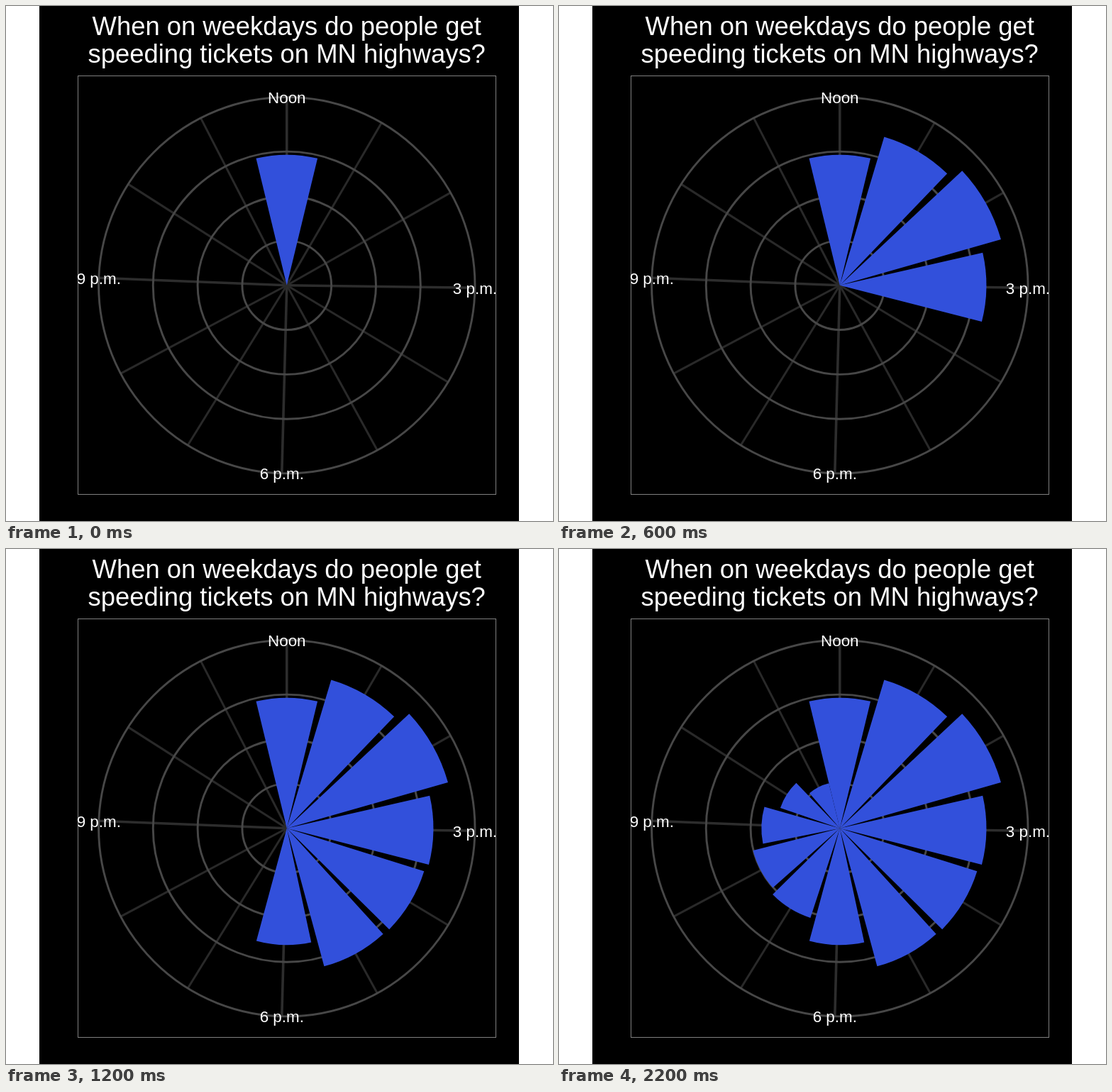
Write an HTML page with a canvas that moves like this. It is 771x726 px and loops after 2.4 s.

```html
<!DOCTYPE html>
<html lang="en">
<head>
<meta charset="utf-8">
<title>Speeding tickets by hour</title>
<style>
html, body { margin: 0; width: 100%; height: 100%; overflow: hidden; background: #fff; }
canvas { display: block; }
</style>
</head>
<body>
<canvas id="stage" width="771" height="726"></canvas>
<script>
const ctx = document.getElementById('stage').getContext('2d');
const CX = 395.8, CY = 393.7, R = 265.2, RING = 62.85;
const STEP = 200;
// The dial spans eleven hour steps plus one bar width of 0.9 hours.
const HOUR = 2 * Math.PI / 11.9, HALF = 0.45 * HOUR;
const bars = [184, 218.4, 236.2, 206.6, 202.8, 201.6, 164.4, 133, 126.2, 110.5, 88.6, 65.4];
const labels = { 0: 'Noon', 3: '3 p.m.', 6: '6 p.m.', 9: '9 p.m.' };

const point = (hour, r) => [CX + r * Math.sin(hour * HOUR), CY - r * Math.cos(hour * HOUR)];

function text(str, x, y, size) {
  ctx.font = `${size}px "Liberation Sans", Arial, sans-serif`;
  ctx.fillText(str, x, y);
}

function spoke(hour) {
  const major = hour in labels;
  ctx.strokeStyle = major ? '#2d2d2d' : '#292929';
  ctx.lineWidth = major ? 3.6 : 3;
  ctx.beginPath();
  ctx.moveTo(CX, CY);
  ctx.lineTo(...point(hour, R));
  ctx.stroke();
}

function ring(r) {
  ctx.strokeStyle = '#474747';
  ctx.lineWidth = 2.9;
  ctx.beginPath();
  ctx.arc(CX, CY, r, 0, 2 * Math.PI);
  ctx.stroke();
}

function wedge(r, hour) {
  const mid = hour * HOUR - Math.PI / 2;
  ctx.fillStyle = '#3250db';
  ctx.beginPath();
  ctx.moveTo(CX, CY);
  ctx.arc(CX, CY, r, mid - HALF, mid + HALF);
  ctx.fill();
}

function draw(shown) {
  ctx.fillStyle = '#fff';
  ctx.fillRect(0, 0, 771, 726);
  ctx.fillStyle = '#000';
  ctx.fillRect(47, 0, 676, 726);

  bars.forEach((_, hour) => spoke(hour));
  [RING, 2 * RING, 3 * RING, R].forEach(ring);
  bars.slice(0, shown).forEach(wedge);

  ctx.strokeStyle = '#7f7f7f';
  ctx.lineWidth = 1;
  ctx.strokeRect(101.5, 98.5, 589, 590);

  ctx.fillStyle = '#fff';
  ctx.textAlign = 'center';
  text('When on weekdays do people get', 395.7, 41, 36.4);
  text('speeding tickets on MN highways?', 395.7, 80.3, 36.4);
  for (const hour in labels) {
    const [x, y] = point(hour, R);
    text(labels[hour], x, y + 8.3, 22.4);
  }
}

const start = performance.now();
function tick() {
  const t = Math.max(0, performance.now() - start);
  draw(Math.floor(t / STEP) % bars.length + 1);
  requestAnimationFrame(tick);
}
tick();
</script>
</body>
</html>
```
